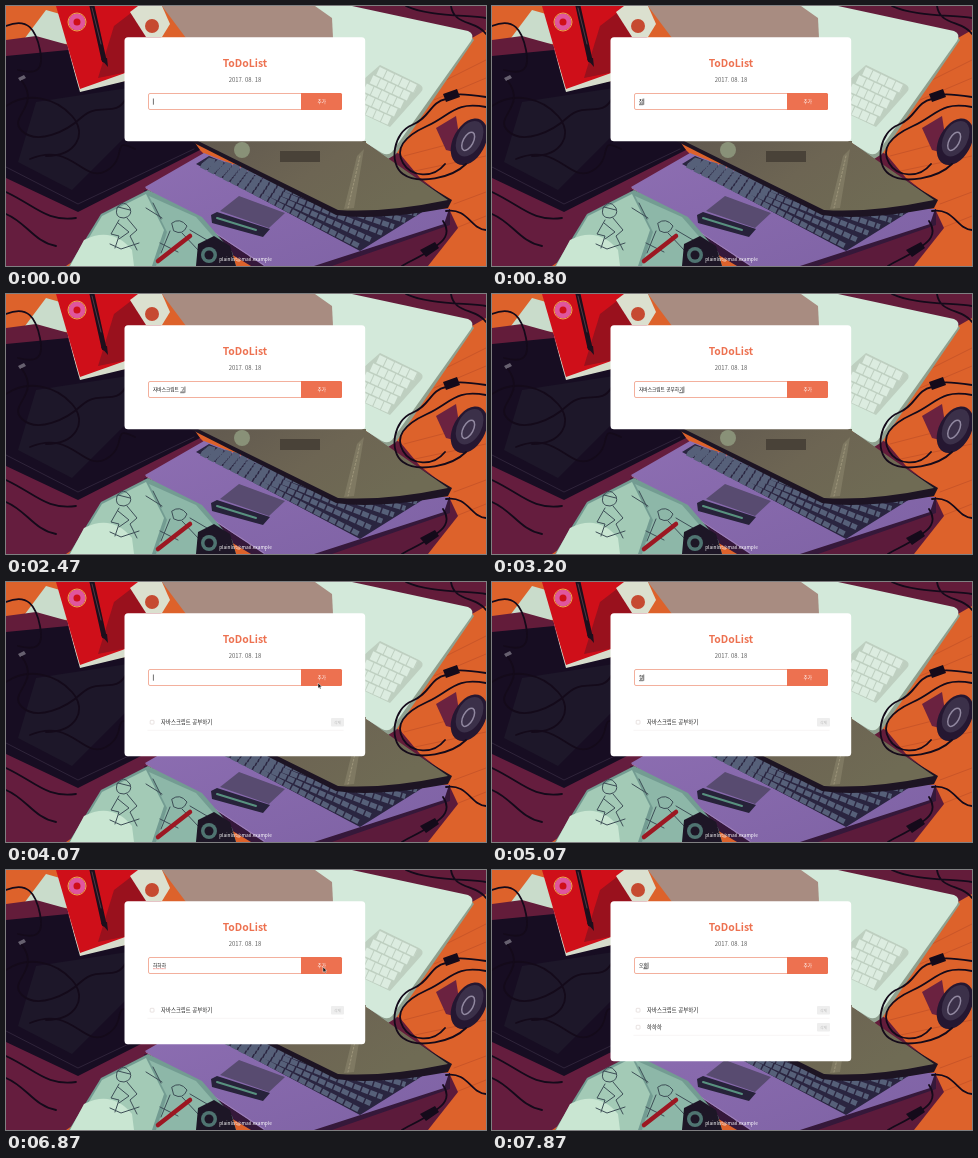
An HTML page that plays this animation: 480 by 260 pixels, repeating every 8000 ms.

```html
<!DOCTYPE html>
<html lang="ko">
<head>
<meta charset="utf-8">
<title>ToDoList</title>
<style>
html, body { margin: 0; width: 100%; height: 100%; overflow: hidden; background: #c9562c; }
svg { display: block; width: 480px; height: 260px; }
text { font-family: "Noto Sans CJK KR", "Noto Sans CJK", "Noto Sans", sans-serif; }
.mid { text-anchor: middle; }
.line { fill: none; stroke-linecap: round; stroke-linejoin: round; }
.keys { fill: none; stroke-linecap: butt; }
</style>
</head>
<body>
<svg viewBox="0 0 480 260" xmlns="http://www.w3.org/2000/svg">
  <defs>
    <linearGradient id="lid" x1="0" y1="0" x2="1" y2=".4">
      <stop offset="0" stop-color="#61594f"/><stop offset=".55" stop-color="#6d6553"/><stop offset="1" stop-color="#6f6b54"/>
    </linearGradient>
    <linearGradient id="deck" x1="0" y1="0" x2="1" y2="1">
      <stop offset="0" stop-color="#8d6eb2"/><stop offset="1" stop-color="#7e62a4"/>
    </linearGradient>
    <g id="row">
      <rect x="144.2" y="138.3" width="3.8" height="3.8" rx=".7" fill="#fff" stroke="#d8cfcd" stroke-width=".6"/>
      <rect x="325" y="136" width="13" height="8.6" rx="1" fill="#eee"/>
      <text class="mid" x="331.5" y="141.8" font-size="3.8" fill="#bdbdbd">삭제</text>
      <path d="M141.5 148.3H337.5" stroke="#f1eeee" stroke-width=".6"/>
    </g>
  </defs>

  <!-- desk -->
  <path fill="#dd622b" d="M0 0H480V260H0z"/>
  <path fill="#c9dccb" d="M16 36L40 4 54 8 62 38z"/>
  <path fill="#631c3a" d="M0 34L30 30 66 40 76 70 0 62z"/>
  <path fill="#631c3a" d="M342 0H480V24L466 32z"/>
  <path class="line" stroke="#c95528" stroke-width="1" d="M440 74L480 54M428 94L480 72M398 150L444 138M404 166L480 150M448 198L480 186M450 222L480 210"/>
  <path fill="#631c3a" d="M362 136L394 148 414 172 440 192 360 150z"/>
  <path fill="#6b2240" d="M430 122L450 110 456 148 440 144z"/>
  <path fill="#651d3e" d="M0 165L70 200 190 140 200 150 142 184 150 200 60 260H0z"/>
  <path fill="#5c1b3b" d="M250 260L444 205 452 222 422 260z"/>

  <!-- notebook, pen and stickers -->
  <path fill="#d6dccb" d="M52 0L74 90 123 74V60z"/>
  <path fill="#cf0f19" d="M50 0H134L156 30 122 66 74 83z"/>
  <path fill="#99111d" d="M108 20L134 0 156 30 122 66 92 72z"/>
  <path class="line" stroke="#1d0f1c" stroke-width="5" d="M86 0L98 54"/>
  <path class="line" stroke="#5d4651" stroke-width=".8" d="M86 2L95 38"/>
  <path fill="#1d0f1c" d="M95 53L101 52 102 61z"/>
  <circle cx="71" cy="16" r="6" fill="none" stroke="#e0559d" stroke-width="5"/>
  <circle cx="71" cy="16" r="9" fill="none" stroke="#e9a94e" stroke-width="1"/>
  <path fill="#dbe0cf" d="M124 6L132 0H156L164 18 156 31H140z"/>
  <circle cx="146" cy="20" r="7" fill="#c64a31"/>

  <!-- dark laptop -->
  <path fill="#170d22" d="M0 50L62 44 74 86 124 74V134H187L194 144 72 206 0 172z"/>
  <path fill="#1d1729" d="M30 96L122 82V128L66 184 12 156z"/>
  <path class="line" stroke="#352a40" stroke-width=".8" d="M0 161L72 198 188 143"/>
  <path fill="#66606f" d="M12 72L18 69 20 72 14 75z"/>

  <!-- white laptop -->
  <path fill="#8fa08f" d="M356 134L382 153 390 148 468 34 463 28z"/>
  <path fill="#d3e9da" d="M308 0H346L462 25Q469 28 465 35L386 146Q382 150 376 147L352 132z"/>
  <path fill="#becfc0" d="M374 59L413 78Q419 81 415 86L384 121 350 105V80z"/>
  <g id="paleKeys" class="keys" stroke="#dcece0" stroke-width="8.6" stroke-dasharray="7.4 1"></g>
  <path fill="#a88c81" d="M156 0H309L326 12 327 32H180z"/>

  <!-- purple laptop -->
  <path fill="#35183a" d="M138 184L146 201 245 260H326L444 219V203z"/>
  <path fill="url(#deck)" d="M139 181L198 147 332 200 443 203 438 218 308 260H258z"/>
  <path class="line" stroke="#a98bc0" stroke-width=".8" d="M140 182L258 259"/>
  <path fill="#2a2540" d="M190 158L203 150 331 203 418 205 354 245z"/>
  <g id="darkKeys" class="keys" stroke="#566079" stroke-width="5.2" stroke-dasharray="7 1.5"></g>
  <path fill="#584b70" d="M233 190L279 207 263 222 214 205z"/>
  <path fill="#27223a" d="M205 209L211 206 264 223 257 231 206 217z"/>
  <path class="line" stroke="#58917f" stroke-width="2" d="M211 212L250 224"/>
  <path fill="#1d1423" d="M184 135L330 209Q370 215 442 202L446 194 348 135z"/>
  <path fill="url(#lid)" d="M192 135L332 204Q380 207 442 194L360 137V135z"/>
  <path fill="#878169" opacity=".7" d="M351 150L358 143 348 202 338 203z"/>
  <path class="line" stroke="#aaa184" stroke-width=".7" stroke-dasharray="2 2" d="M354 150L342 202"/>
  <circle cx="236" cy="144" r="8" fill="#899178"/>
  <rect x="274" y="145" width="40" height="11" fill="#494238"/>

  <!-- sketchbook -->
  <path fill="#739c92" d="M63 260L95 208 142 184 196 211 226 246 230 260z"/>
  <path fill="#a3cab6" d="M66 260L96 210 140 188 158 224 146 260z"/>
  <path fill="#8db7a8" d="M143 190L190 211 218 243 224 260H150L161 226z"/>
  <path fill="#c9e6d2" d="M64 260L78 234Q106 220 126 244L128 260z"/>
  <g class="line" stroke="#3d4e56" stroke-width="1">
    <path d="M111 202q6-10 13 0q3 8-6 10q-10 0-7-10M113 214l-8 14 8 2-4 12M121 212l10 12-7 6 7 14M112 217l11 9-10 7M104 238l11 5 18-6M112 201l12 3"/>
    <path d="M140 202l16 10M147 197l8 16M166 217q8-6 15 3q-4 10-13 5zM164 225l-9 22M176 227l17 18M154 237l18 9M184 224l17 10"/>
  </g>
  <path class="line" stroke="#9c1722" stroke-width="4.500" d="M152 255L184 230"/>
  <path fill="#1d1626" d="M192 238L208 230 224 240 230 260H190z"/>
  <circle cx="203" cy="249" r="8" fill="#4f7471"/>
  <circle cx="203" cy="249" r="4.500" fill="#1d1626"/>

  <!-- mouse device and cables -->
  <g transform="rotate(28 464 134)">
    <ellipse cx="464" cy="136" rx="16" ry="25" fill="#251731"/>
    <ellipse cx="463" cy="133" rx="12" ry="19" fill="#3b3049"/>
    <ellipse cx="463" cy="136" rx="5" ry="10" fill="none" stroke="#9188a0" stroke-width="1.500"/>
  </g>
  <g class="line" stroke="#140a1a" stroke-width="1.800">
    <path d="M0 20C22 11 30 24 34 44S31 69 12 64M0 100C22 85 50 92 66 110S70 150 40 150"/>
    <path d="M16 75C35 101 1 111 16 125S60 126 76 111 110 111 119 94M24 153C66 135 77 178 100 165S104 130 129 143"/>
    <path d="M0 186C30 200 40 216 70 212M0 208C20 216 28 236 50 240"/>
    <path d="M480 91C460 88 452 88 448 89M440 93C424 96 424 112 406 119S382 157 397 168 446 172 460 158"/>
    <path d="M480 101C449 95 445 109 421 120S389 143 397 157 427 173 439 158"/>
    <path d="M445 0C448 20 470 14 480 28M400 0C420 10 460 9 480 12"/>
    <path d="M437 215C446 228 436 236 430 240M418 248C408 254 402 256 396 260M440 205C461 201 466 224 480 224"/>
  </g>
  <path fill="#140a1a" d="M437 88L451 83 454 91 440 96zM414 244L429 236 433 242 420 251z"/>
  <text class="mid" x="239.500" y="255" font-size="4.800" font-weight="500" fill="#fff">plainlist@mail.example</text>

  <!-- card -->
  <rect id="card" x="118.500" y="31.300" width="240.700" height="104" rx="3.500" fill="#fff"/>
  <text class="mid" x="239" y="61.400" font-size="10.400" font-weight="700" fill="#ed7150">ToDoList</text>
  <text class="mid" x="239" y="76.400" font-size="5.900" fill="#606060">2017. 08. 18</text>
  <rect x="142.500" y="87.500" width="193" height="16" rx="1.500" fill="#fff" stroke="#f3b09d"/>
  <path fill="#ed7150" d="M295 87H334.500Q336 87 336 88.500V102.500Q336 104 334.500 104H295z"/>
  <text class="mid" x="315.700" y="97.200" font-size="4.600" font-weight="500" fill="#fff">추가</text>
  <text id="field" x="147" y="97.300" font-size="4.700" font-weight="500" fill="#111"></text>
  <path id="underline" fill="none" stroke-width=".7"/>
  <path id="caret" fill="none" stroke="#333" stroke-width=".7"/>
  <g id="first"><use href="#row"/><text x="155" y="142" font-size="5.400" font-weight="500" fill="#222">자바스크립트 공부하기</text></g>
  <g id="second"><use href="#row" y="17"/><text x="155" y="159" font-size="5.400" font-weight="500" fill="#222">하하하</text></g>
  <path id="pointer" fill="#111" stroke="#fff" stroke-width=".45" d="M0 0V5.300L1.250 4.200 2.150 6 3.100 5.500 2.250 3.800 3.900 3.700z"/>
</svg>
<script>
const LOOP = 8000, FIRST_ADD = 3930, SECOND_ADD = 6930;
const $ = id => document.getElementById(id);
const show = (id, on) => $(id).setAttribute("visibility", on ? "visible" : "hidden");

// Parallel rows of keys from one edge of a keyboard to the other.
function addRows(id, count, a, b, c, d) {
  const mix = (p, q, u) => p.map((v, i) => v + (q[i] - v) * u).join(" ");
  let path = "";
  for (let i = 0; i < count; i++) {
    const u = i / (count - 1);
    path += `M${mix(a, c, u)}L${mix(b, d, u)}`;
  }
  $(id).innerHTML = `<path d="${path}"/>`;
}
addRows("darkKeys", 6, [202, 154], [411, 208], [195, 159], [353, 240]);
addRows("paleKeys", 5, [372, 65], [410, 83], [346, 98], [384, 115]);

const typing = [];
function type(start, step, words) {
  words.forEach((text, i) => typing.push({ at: start + i * step, text }));
}
type(0, 0, [""]);
type(510, 140, ["ㅈ", "자", "잡", "자바", "자밧", "자바스", "자바슼", "자바스크", "자바스클"]);
type(1800, 100, ["자바스크리", "자바스크립", "자바스크립ㅌ", "자바스크립트", "자바스크립트 ",
  "자바스크립트 ㄱ", "자바스크립트 고", "자바스크립트 공", "자바스크립트 공ㅂ"]);
type(2730, 94, ["자바스크립트 공부", "자바스크립트 공붛", "자바스크립트 공부하",
  "자바스크립트 공부학", "자바스크립트 공부하기"]);
type(FIRST_ADD, 0, [""]);
type(4700, 180, ["ㅎ", "하", "핳"]);
type(5300, 140, ["하하", "하핳", "하하하"]);
type(SECOND_ADD, 0, [""]);
type(7530, 70, ["ㅇ", "오"]);
type(7800, 70, ["오호", "오홀"]);

// Time, x, y along each visible stretch of the pointer.
const trips = [
  [[3400, 356, 152], [3600, 331, 119], [3800, 312, 101], [4300, 312, 101]],
  [[6000, 326, 94], [6200, 340, 79], [6400, 340, 79], [6730, 317, 97], [7530, 317, 97]]
];
const ease = u => u * u * (3 - 2 * u);

function pointerAt(t) {
  const trip = trips.find(p => t >= p[0][0] && t < p[p.length - 1][0]);
  if (!trip) return null;
  const i = trip.findIndex(p => p[0] > t);
  const [t0, x0, y0] = trip[i - 1], [t1, x1, y1] = trip[i];
  const u = ease((t - t0) / (t1 - t0));
  return [x0 + (x1 - x0) * u, y0 + (y1 - y0) * u];
}

function render(t) {
  const state = typing.filter(s => s.at <= t).pop();
  const field = $("field");
  if (field.textContent !== state.text) field.textContent = state.text;
  const end = 147 + (state.text ? field.getComputedTextLength() : 0);
  const settled = state.text === "하하하" && t >= 6000;
  const composing = state.text && !state.text.endsWith(" ") && !settled;

  $("caret").setAttribute("d", `M${end + .4} 92.5V98.7`);
  show("caret", !settled && (t - state.at) % 1000 < 530);
  const left = settled ? 147 : Math.max(147, end - 4.3);
  $("underline").setAttribute("d", `M${left} 98.7H${end}`);
  $("underline").setAttribute("stroke", settled ? "#e65a50" : "#333");
  $("underline").setAttribute("stroke-dasharray", settled ? ".8 .5" : "none");
  show("underline", settled || composing);

  show("first", t >= FIRST_ADD);
  show("second", t >= SECOND_ADD);
  $("card").setAttribute("height", t < FIRST_ADD ? 104 : t < SECOND_ADD ? 143 : 160);

  const pos = pointerAt(t);
  show("pointer", pos);
  if (pos) $("pointer").setAttribute("transform", `translate(${pos})`);
}

function tick() {
  render(performance.now() % LOOP);
  requestAnimationFrame(tick);
}
tick();
</script>
</body>
</html>
```
